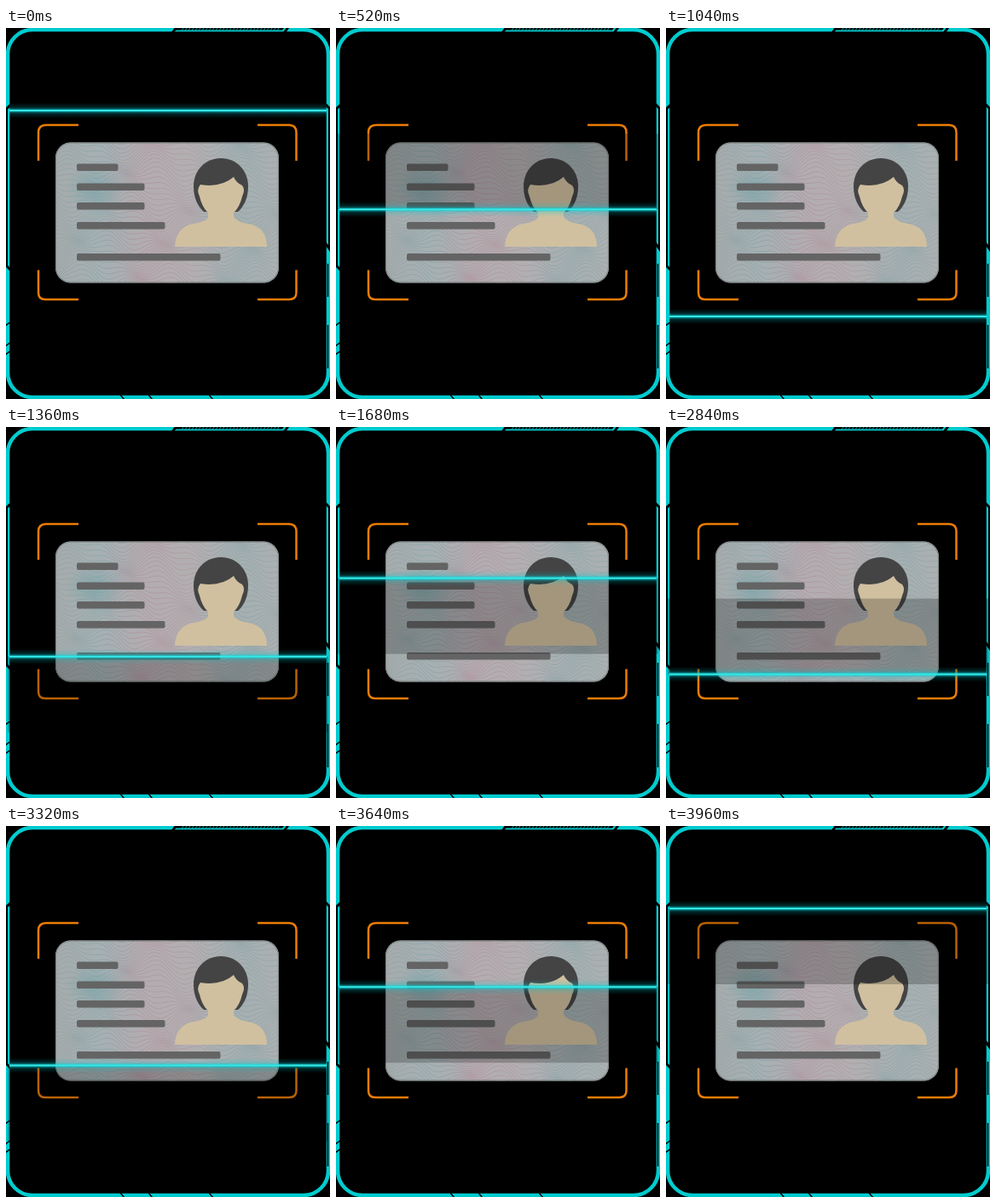
An HTML page that plays this animation: 380 px wide and 436 px high, repeating every 4 s.

```html
<!DOCTYPE html>
<html lang="en">
<head>
<meta charset="utf-8">
<title>Card scan</title>
<style>
  html, body { margin: 0; width: 100%; height: 100%; overflow: hidden; background: #000; }
  svg { display: block; width: 380px; height: 436px; }
</style>
</head>
<body>
<svg viewBox="0 0 380 436">
  <defs>
    <linearGradient id="paper">
      <stop offset="0" stop-color="#a6abac"/>
      <stop offset=".2" stop-color="#a6b0b2"/>
      <stop offset=".42" stop-color="#b3acb0"/>
      <stop offset=".62" stop-color="#b2afb1"/>
      <stop offset=".85" stop-color="#a5afb1"/>
      <stop offset="1" stop-color="#acb0b1"/>
    </linearGradient>
    <linearGradient id="ink" gradientUnits="userSpaceOnUse" x1="58" x2="320" y1="0" y2="0">
      <stop offset="0" stop-color="#8b9b9e"/>
      <stop offset=".2" stop-color="#6f9ea4"/>
      <stop offset=".38" stop-color="#b0818f"/>
      <stop offset=".6" stop-color="#a98d98"/>
      <stop offset=".75" stop-color="#739da2"/>
      <stop offset="1" stop-color="#8a9da0"/>
    </linearGradient>
    <radialGradient id="patch">
      <stop offset="0" stop-color="#72a2a8" stop-opacity=".6"/>
      <stop offset="1" stop-color="#72a2a8" stop-opacity="0"/>
    </radialGradient>
    <linearGradient id="glow" x1="0" x2="0" y1="0" y2="1">
      <stop offset="0" stop-color="#00c8d0" stop-opacity="0"/>
      <stop offset=".3" stop-color="#00c8d0" stop-opacity=".2"/>
      <stop offset=".5" stop-color="#00d8dc" stop-opacity=".85"/>
      <stop offset=".7" stop-color="#00c8d0" stop-opacity=".2"/>
      <stop offset="1" stop-color="#00c8d0" stop-opacity="0"/>
    </linearGradient>
    <clipPath id="cardShape"><rect x="58" y="134.500" width="262" height="165" rx="18"/></clipPath>
  </defs>

  <rect width="380" height="436"/>

  <g clip-path="url(#cardShape)">
    <rect x="58" y="134" width="262" height="166" fill="url(#paper)"/>
    <ellipse cx="103" cy="188" rx="34" ry="26" fill="url(#patch)"/>
    <path id="waves" fill="none" stroke="url(#ink)" stroke-width="1" opacity=".45"/>
    <rect x="58.500" y="135" width="261" height="164" rx="17.500" fill="none" stroke="#858b8b" stroke-width="1.500"/>
  </g>
  <g fill="#646464">
    <rect x="83" y="159.500" width="48.500" height="8.500" rx="2"/>
    <rect x="83" y="182.500" width="79.500" height="8.500" rx="2"/>
    <rect x="83" y="205" width="79.500" height="8.500" rx="2"/>
    <rect x="83" y="228" width="103.500" height="8.500" rx="2"/>
    <rect x="83" y="265" width="168.500" height="8.500" rx="2"/>
  </g>

  <!-- portrait -->
  <path fill="#444" d="M232 216C224 209 220 198 220 186C220 167 234 153 252 153S284 167 284 186C284 198 280 209 272 216Z"/>
  <path fill="#d0c0a0" d="M228 184Q252 188 267 175Q270 182 277 185Q281 190 277 198Q274 211 267 217V222Q269 227 284 230Q306 234 306 257H198Q199 234 220 230Q236 227 237 222V217Q230 211 227 198Q223 190 228 184Z"/>

  <path fill="none" stroke="#ec7d05" stroke-width="2.500" d="M85 114H47Q38 114 38 123V156M295 114H332Q340.500 114 340.500 123V156M38 284.500V311Q38 319 46 319H85M340.500 284.500V311Q340.500 319 332 319H295"/>

  <!-- outer frame and its notches -->
  <rect x="2" y="2" width="376" height="432" rx="29" fill="none" stroke="#00cccf" stroke-width="4.500"/>
  <path d="M0 95H2V280H0ZM380 95H378V258H380ZM200 0H326L324 2.500H199Z"/>
  <path fill="none" stroke="#000" stroke-width="3" d="M-1 96L6 90M-1 278L6 285M374 89L381 96M374 252L381 262M195 6L200 -1M326 6L331 -1"/>
  <path fill="none" stroke="#000" stroke-width="1.500" d="M-1 350L6 345M-1 374L6 369M-1 384L6 379M134 431L139 437M167 431L172 437M238 431L243 437M377.500 277V316M377.500 349V400"/>
  <path id="ticks" fill="none" stroke="#00a5a8" stroke-width="1"/>

  <rect id="shade" x="2" width="376" height="89" opacity=".22"/>
  <g id="beam">
    <rect x="4" y="-9" width="372" height="18" fill="url(#glow)"/>
    <rect x="4" y="-1" width="372" height="2" fill="#35e6e6"/>
  </g>
</svg>
<script>
const LOOP = 2000, STEP = 40, TOP = 97, BOTTOM = 339, SHADE = 89;
const DOWN = [40, 1040], UP = [1120, 1960];
const $ = id => document.getElementById(id);

function wave(base) {
  let d = '';
  for (let x = 54; x <= 324; x += 6) {
    const y = base + 9 * Math.sin(x / 17 + base / 23) + 5 * Math.sin(x / 8 - base / 15);
    d += (d ? 'L' : 'M') + x + ' ' + y.toFixed(1);
  }
  return d;
}

let waves = '', ticks = '';
for (let y = 122; y < 314; y += 4) waves += wave(y);
for (let x = 206; x < 321; x += 4) ticks += `M${x} 3L${x + 2} 0`;
$('waves').setAttribute('d', waves);
$('ticks').setAttribute('d', ticks);

const progress = (t, [start, end]) => Math.min(1, Math.max(0, (t - start) / (end - start)));

function draw(now) {
  const t = Math.floor(now / STEP) * STEP % LOOP;
  const y = TOP + (BOTTOM - TOP) * (progress(t, DOWN) - progress(t, UP));
  const falling = t > DOWN[0] && t < DOWN[1];
  const rising = t >= UP[0] && t <= UP[1];
  $('beam').setAttribute('transform', `translate(0 ${y})`);
  // The shade trails the beam and is absent while the beam rests.
  $('shade').setAttribute('y', falling ? y - SHADE : y);
  $('shade').setAttribute('visibility', falling || rising ? 'visible' : 'hidden');
}

const start = performance.now();
function tick() {
  draw(performance.now() - start);
  requestAnimationFrame(tick);
}
tick();
</script>
</body>
</html>
```
